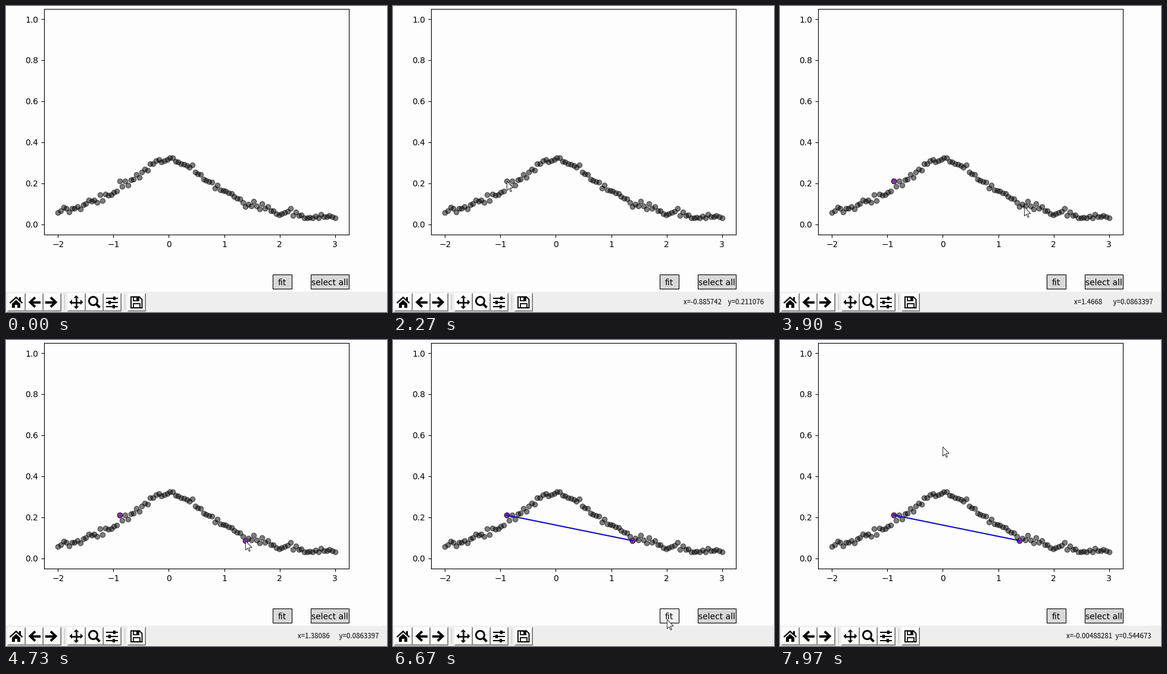
Write a matplotlib script that moves like this. It is 640 by 514 pixels and loops after 8000 ms.

```python
import numpy as np
import matplotlib.pyplot as plt
from matplotlib.animation import FuncAnimation
from matplotlib.patches import Circle, Polygon, Rectangle

W, H, DPI = 640, 514, 100
STEP, FRAMES = 40, 200
LEFT, BOTTOM, AX_W, AX_H = 64, 384, 512, 379.2
PAPER, BAR, FACE = "#fdfdfd", "#eeeeee", "#fbfbfb"
BTN, BTN_HOVER = "#d8d8d8", "#f2f2f2"
INK = "#080808"

# noisy Cauchy curve; the two picked samples sit off the curve
FIRST, SECOND = 22, 67
xs = np.linspace(-2, 3, 100)
noise = np.random.default_rng(4).normal(0, 0.009, xs.size)
noise[[FIRST, SECOND]] = 0.033, -0.023
ys = 1 / (np.pi * (1 + xs**2)) + noise

# pointer path: time in ms, x, y in pixels
PATH = [
    (1080, 30, 247), (1360, 160, 293), (1640, 191, 294), (2640, 191, 294),
    (3000, 349, 333), (3880, 410, 337), (4200, 402, 337), (5160, 402, 337),
    (5680, 460, 469), (7360, 460, 469), (7960, 273, 179),
]
TIMES, PATH_X, PATH_Y = zip(*PATH)
SHOW_AT, PICK_1, PICK_2, FIT_AT = 1400, 2400, 4560, 6240

fig = plt.figure(figsize=(W / DPI, H / DPI), dpi=DPI, facecolor=PAPER)

# data plot
ax = fig.add_axes([LEFT / W, 1 - BOTTOM / H, AX_W / W, AX_H / H], facecolor=PAPER)
ax.set(xlim=(-2.25, 3.25), ylim=(-0.05, 1.05))
ax.set_xticks(range(-2, 4))
ax.set_yticks(np.linspace(0, 1, 6))
ax.plot(xs, ys, "o", ms=6, color="black", alpha=0.5)


def picked_dot(i):
    dot, = ax.plot(xs[i], ys[i], "o", ms=6, mfc="#80389a", mec="#4a2058",
                   visible=False, zorder=3)
    return dot


ends = [FIRST, SECOND]
dots = [picked_dot(i) for i in ends]
fit_line, = ax.plot(xs[ends], ys[ends], color="#0c0cc4", lw=1.5,
                    visible=False, zorder=4)

# window chrome, in pixel coordinates
ui = fig.add_axes([0, 0, 1, 1], zorder=5)
ui.set(xlim=(0, W), ylim=(H, 0))
ui.axis("off")


def px(v):
    return v * 72 / DPI


def box(x, y, w, h, fc, ec="none", lw=0):
    return ui.add_patch(Rectangle((x, y), w, h, fc=fc, ec=ec, lw=px(lw)))


def stroke(points, width, color=INK):
    ui.plot(*zip(*points), color=color, lw=px(width), solid_capstyle="butt",
            solid_joinstyle="miter")


def solid(points, fc=INK, ec="none", lw=0):
    return ui.add_patch(Polygon(points, fc=fc, ec=ec, lw=px(lw), joinstyle="miter"))


def button(x, w, label):
    patch = box(x, 451.2, w, 24, BTN, "black", 1.1)
    ui.text(x + w / 2, 463.2, label, size=10, ha="center", va="center_baseline")
    return patch


def tool_face(x):
    box(x, 482, 30, 30, FACE)
    stroke([(x + 28.5, 483), (x + 28.5, 510.5), (x + 1, 510.5)], 1, "#a8a8a8")
    stroke([(x + 29.5, 482), (x + 29.5, 511.5), (x, 511.5)], 1, "#686868")


def home(cx):
    stroke([(cx - 10.5, 499), (cx, 489.5), (cx + 10.5, 499)], 2.4)
    solid([(cx - 7, 500), (cx, 493.7), (cx + 7, 500), (cx + 7, 507), (cx - 7, 507)])
    box(cx - 2, 502, 4, 5, FACE)
    box(cx + 5, 489, 2.6, 6, INK)


def arrow(cx, side):
    tip = cx + side * 8
    stroke([(cx - side, 489.5), (tip - side * 0.5, 497.5), (cx - side, 505.5)], 4)
    stroke([(cx - side * 10, 497.5), (tip - side, 497.5)], 4)


def pan(cx, cy):
    stroke([(cx - 8, cy), (cx + 8, cy)], 2.6)
    stroke([(cx, cy - 8), (cx, cy + 8)], 2.6)
    for dx, dy in ((1, 0), (-1, 0), (0, 1), (0, -1)):
        bx, by = cx + dx * 7, cy + dy * 7
        solid([(cx + dx * 11.5, cy + dy * 11.5),
               (bx + dy * 4.5, by + dx * 4.5), (bx - dy * 4.5, by - dx * 4.5)])


def zoom(cx, cy):
    ui.add_patch(Circle((cx, cy), 7, fc="none", ec=INK, lw=px(3)))
    stroke([(cx + 5, cy + 5), (cx + 11, cy + 11)], 4)


def sliders(cx):
    for y, shift in ((491, 4), (498, -4), (505, 3)):
        stroke([(cx - 10, y), (cx + 10, y)], 2)
        box(cx + shift - 3.5, y - 3, 7, 6, FACE)
        box(cx + shift - 2, y - 3, 4, 6, INK)


def save(x, y):
    solid([(x, y), (x + 14, y), (x + 18.5, y + 4.5), (x + 18.5, y + 18.5),
           (x, y + 18.5)], "none", INK, 2)
    box(x + 4, y + 0.5, 9, 6, "none", INK, 1.8)
    box(x + 8.5, y + 0.5, 3, 5, INK)
    box(x + 4, y + 11.5, 10.5, 7, "none", INK, 1.8)


fit_button = button(448, 32, "fit")
button(512, 64, "select all")

box(0, 480, W, H - 480, BAR)
for x in (2, 32, 62, 103, 133, 163, 204):
    tool_face(x)
for x in (97.5, 198.5):
    stroke([(x, 484), (x, 510)], 1, "#c0c0c0")
home(17)
arrow(48, -1)
arrow(76, 1)
pan(118, 497.5)
zoom(146.5, 495.5)
sliders(178)
save(210, 488.5)

readout = ui.text(0, 501, "", family="Noto Sans CJK JP", size=px(11.5),
                  ha="right", va="baseline", color="black")

ARROW = np.array([(0.5, 0.5), (0.5, 16), (4, 12.7), (6.3, 18), (8.3, 17.2),
                  (6, 11.8), (11, 11.5)])
pointer = solid(ARROW, "white", "#181818", 0.9)
pointer.set_zorder(10)


def show_coords(x, y):
    inside = LEFT <= x <= LEFT + AX_W and BOTTOM - AX_H <= y <= BOTTOM
    if not inside:
        readout.set_text("")
        return
    vx = f"{(x - LEFT) / AX_W * 5.5 - 2.25:.6g}"
    vy = f"{(BOTTOM - y) / AX_H * 1.1 - 0.05:.6g}"
    readout.set_text(f"x={vx:<12} y={vy}")
    readout.set_x(635 - 2.9 * (12 - len(vy)))


def update(frame):
    t = frame * STEP
    x, y = (round(float(np.interp(t, TIMES, p))) for p in (PATH_X, PATH_Y))
    pointer.set_xy(ARROW + (x, y))
    pointer.set_visible(t >= SHOW_AT)
    show_coords(x, y)
    hover = 448 <= x <= 480 and 451 <= y <= 475
    fit_button.set_facecolor(BTN_HOVER if hover else BTN)
    dots[0].set_visible(t >= PICK_1)
    dots[1].set_visible(t >= PICK_2)
    fit_line.set_visible(t >= FIT_AT)
    return pointer, readout, fit_button, fit_line, *dots


anim = FuncAnimation(fig, update, frames=FRAMES, interval=STEP, repeat=True,
                     repeat_delay=0, blit=False)
plt.show()
```
